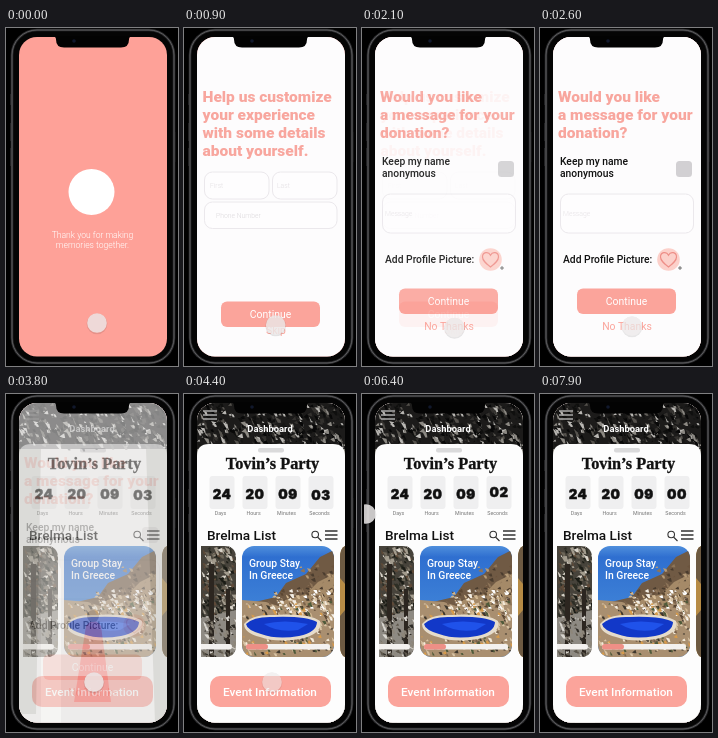
Recreate the animation shown at these times as an HTML page. Size 172 by 338 pixels, loop 8 s.

```html
<!DOCTYPE html>
<html lang="en">
<head>
<meta charset="utf-8">
<title>Gift app walkthrough</title>
<style>
html, body { margin: 0; width: 100%; height: 100%; overflow: hidden; background: #000; }
svg { display: block; width: 172px; height: 338px; font-family: Roboto, sans-serif; }
</style>
</head>
<body>
<svg id="stage" viewBox="0 0 172 338"></svg>
<script>
const LOOP = 8000, STEP = 100, PINK = '#fba49b', INK = '#111';

let seed = 7;
const rand = () => (seed = seed * 16807 % 2147483647) / 2147483647;

const rect = (x, y, w, h, r, fill, extra = '') =>
  `<rect x="${x}" y="${y}" width="${w}" height="${h}" rx="${r}" fill="${fill}" ${extra}/>`;
const text = (str, x, y, size, fill, weight = 400, extra = '') =>
  `<text x="${x}" y="${y}" font-size="${size}" fill="${fill}" font-weight="${weight}" ${extra}>${str}</text>`;
const centred = (str, x, y, size, fill, weight = 400, extra = '') =>
  text(str, x, y, size, fill, weight, `text-anchor="middle" ${extra}`);
const path = (d, fill, extra = '') => `<path d="${d}" fill="${fill}" ${extra}/>`;
const lines = (rows, x, y, gap, size, fill, weight) =>
  rows.map((row, i) => text(row, x, y + i * gap, size, fill, weight)).join('');
const field = (x, y, w, h) => rect(x, y, w, h, 8, '#fefdfe', 'stroke="#ebe8ec"');
const menu = (x, y, w, gap, colour) =>
  path(`M${x} ${y}h${w}m${-w} ${gap}h${w}m${-w} ${gap}h${w}`, 'none', `stroke="${colour}" stroke-width="1.3"`);
const button = (label, y) =>
  rect(37, y, 99, 25.5, 6, PINK) + centred(label, 86.5, y + 16.4, 10.4, '#fff');
const backdrop = fill => rect(13, 9, 148, 320, 0, fill);

// Scatters small slivers of foliage, stone or light over an area.
function speckle(x, y, w, h, count, colours, size = 3) {
  let out = '';
  for (let i = 0; i < count; i++) {
    const px = x + rand() * w, py = y + rand() * h, s = 1 + rand() * size, lean = (rand() - .5) * 2 * size;
    const fill = colours[Math.floor(rand() * colours.length)];
    out += path(`M${px.toFixed(1)} ${py.toFixed(1)}l${s.toFixed(1)} ${lean.toFixed(1)} 1 ${s.toFixed(1)}-2 0z`, fill);
  }
  return out;
}

const thanks = backdrop('#fea198') +
  '<circle cx="85.5" cy="164" r="23" fill="#fff"/>' +
  centred('Thank you for making', 86.5, 210, 8.6, '#fff', 300) +
  centred('memories together.', 86.5, 220, 8.6, '#fff', 300);

const details = backdrop('#fdfcfd') +
  lines(['Help us customize', 'your experience', 'with some details', 'about yourself.'], 18.5, 73.5, 18.1, 15.5, '#f8a69e', 900) +
  field(20.5, 144, 64.5, 27) + field(88.5, 144, 64.5, 27) + field(20.5, 174, 132.5, 26.5) +
  text('First', 26, 160, 6.8, '#e3dfe3', 300) + text('Last', 93, 160, 6.8, '#e3dfe3', 300) +
  text('Phone Number', 32, 189.5, 6.8, '#dcd8dc', 300) +
  button('Continue', 273.5) + centred('Skip', 92, 305.5, 10.4, PINK);

const message = backdrop('#fdfcfd') +
  lines(['Would you like', 'a message for your', 'donation?'], 18, 74, 18.2, 15.5, '#f8a69e', 900) +
  lines(['Keep my name', 'anonymous'], 20, 136.5, 12, 10.3, INK, 500) +
  rect(136, 133, 16, 16, 3.5, '#d2d0d3') +
  field(20.5, 166, 133, 39) + text('Message', 23, 188, 6.8, '#e6e2e6', 300) +
  text('Add Profile Picture:', 23, 235, 10.3, INK, 500) +
  '<circle cx="128.5" cy="231.5" r="11.3" fill="#fcd0ca"/>' +
  path('M128.5 239c-5-4-8-6.5-8-10 0-5 6-6 8-1.8 2-4.2 8-3.2 8 1.8 0 3.5-3 6-8 10z', 'none', 'stroke="#ee8f88" stroke-width="1.2"') +
  path('M138 240h4m-2-2v4', 'none', 'stroke="#555" stroke-width=".8"') +
  button('Continue', 260.5) + centred('No Thanks', 87, 301.5, 10.4, PINK);

const garden = backdrop('#bdb9b3') +
  rect(13, 9, 148, 46, 0, '#1c1b1a') +
  speckle(13, 9, 146, 42, 420, ['#080808', '#0f0f0e', '#33312e', '#55524d', '#8c8983', '#b9b7b3', '#161615'], 4) +
  path('M13 55h22l-5 265H13zM140 55h21v274h-12z', '#77746b') +
  path('M35 329V175q10-22 20 0v154z', '#dedbd5') +
  path('M80 232q8-10 15 0l10 76H68z', '#d23a36') +
  '<circle cx="87" cy="222" r="6" fill="#574236"/>';

const island = '<g clip-path="url(#main)">' +
  rect(58, 152, 92, 111, 0, 'url(#sky)') +
  path('M150 156l-14 7-14 17-20 9-10 14-34 8v10h92z', '#705a44') +
  path('M150 180l-16 8-12 12-24 7-8 14h60z', '#a58a68') +
  path('M58 206l24 2 24 8 44-10v57H58z', '#a98f70') +
  speckle(112, 172, 38, 40, 70, ['#4a3c2e', '#8d7458', '#b59a76', '#6c543e']) +
  speckle(88, 196, 60, 26, 110, ['#f4efe6', '#d2b892', '#5c4834', '#fff']) +
  speckle(58, 206, 90, 54, 210, ['#d9c4a5', '#7b634c', '#3f382e', '#d79b4b', '#f3ead9', '#4f5a3a']) +
  path('M60 230q8-10 30-9 34-2 46 6 3 13-20 18-24 4-40-2-16-4-16-13z', '#e6dccb') +
  path('M62 230q8-8 28-7 32-1 43 5 0 10-18 14-22 4-38-2-14-4-15-10z', '#1238c8') +
  path('M80 230q20-5 44 0l-10 6q-20 3-34-6z', '#1f52ea') +
  rect(62, 250, 84, 5.5, 2.7, '#f3f1ef') + rect(62, 250, 22, 5.5, 2.7, '#ee8f86') + '</g>' +
  lines(['Group Stay', 'In Greece'], 65, 172.5, 12, 10.4, '#fff', 500);

const neighbours = '<g clip-path="url(#left)">' + rect(17, 152, 35, 111, 0, '#47433b') +
  speckle(17, 152, 34, 72, 230, ['#1b1c16', '#2d2e25', '#6d6658', '#a39c8e', '#d8d3c9', '#5f4a38'], 4) +
  path('M17 224l35-8v47H17z', '#8e8a83') + path('M25 170h5v93h-5zM42 195h4v68h-4z', '#2c2620') +
  speckle(17, 220, 34, 42, 110, ['#d9d6d0', '#2f2c27', '#8d867a', '#5d574c']) +
  rect(10, 250, 38, 5.5, 2.7, '#f3f1ef') + '</g>' +
  path('M161 152q-5 2-5 12v87q0 10 5 12z', '#b68b45') +
  path('M161 152q-5 2-5 12v20l5 6zM156 222l5-6v47q-5-2-5-12z', '#6d5a42');

const counters = [['24', 'Days'], ['20', 'Hours'], ['09', 'Minutes'], ['03', 'Seconds']].map(([value, unit], i) => {
  const x = 38 + i * 33;
  return rect(x - 12.5, 82, 25, 33, 3, '#efeff0') +
    centred(value, x, 104.5, 13.3, INK, 900, `id="${unit}" font-family="Inter, sans-serif" letter-spacing=".5" stroke="${INK}" stroke-width=".4"`) +
    centred(unit, x - 1.5, 121.3, 5.3, '#777');
}).join('');

const card = centred('Dashboard', 86, 37.5, 9.4, '#fff', 700) +
  menu(19, 17, 14, 4, '#aaa') +
  path('M13 62q0-12 12-12h124q12 0 12 12v267H13z', '#fdfdfd') +
  rect(74, 54, 26, 4.5, 2, '#dadadb') +
  centred('Tovin’s Party', 88.5, 74.5, 16.3, INK, 700, `font-family="Liberation Serif, serif" stroke="${INK}" stroke-width=".3"`) +
  counters +
  text('Brelma List', 23, 146, 13.6, INK, 500) +
  path('M134 143.5l3.500 3.500M134.500 140.500a3.300 3.300 0 1 1-6.600 0a3.300 3.300 0 1 1 6.600 0', 'none', 'stroke="#333" stroke-width="1.1"') +
  menu(141, 137, 12.5, 4, '#333') +
  neighbours + island +
  rect(26, 282, 121, 31, 10, PINK) + centred('Event Information', 86, 302, 11.8, '#fff', 500);

const stage = document.getElementById('stage');
stage.innerHTML = `
  <defs>
    <clipPath id="screen">${rect(13, 9, 148, 319.5, 18, '#fff')}</clipPath>
    <clipPath id="main">${rect(58, 152, 92, 111, 12, '#fff')}</clipPath>
    <clipPath id="left">${path('M17 152h23q12 0 12 12v87q0 12-12 12h-23z', '#fff')}</clipPath>
    <clipPath id="edge">${rect(2, 0, 170, 338, 0, '#fff')}</clipPath>
    <linearGradient id="sky" x2="0" y2="1">
      <stop stop-color="#4f8fdc"/><stop offset=".1" stop-color="#2f6fd0"/><stop offset=".5" stop-color="#3c7fd6"/>
    </linearGradient>
  </defs>
  ${rect(0, 0, 172, 338, 0, '#000')}
  ${path('M5 66v11M5 95v18M5 120v18M168.500 104v30', 'none', 'stroke="#2b2b2d" stroke-width="1.5"')}
  ${rect(6, 2, 162, 333, 25, '#050505', 'stroke="#2a2a2c" stroke-width="2.6"')}
  ${rect(6, 2, 162, 333, 25, 'none', 'stroke="#5c5c5e" stroke-width="1"')}
  <g clip-path="url(#screen)">
    <g>${thanks}</g><g id="details">${details}</g><g id="message">${message}</g>
    <g id="garden">${garden}</g><g id="card">${card}</g>
  </g>
  ${path('M47 8.500q3 0 3 3 0 8 8 8h57q8 0 8-8 0-3 3-3z', '#030303')}
  <circle cx="68" cy="13" r="1.8" fill="#11182c"/>
  <g clip-path="url(#edge)"><g id="touch">
    <circle cy=".8" r="10.4" fill="#000" opacity=".12"/><circle r="9.8" fill="#ebe8e8"/>
  </g></g>`;

const [detailsEl, messageEl, gardenEl, cardEl, touchEl, secondsEl] =
  ['details', 'message', 'garden', 'card', 'touch', 'Seconds'].map(id => document.getElementById(id));

// time, x, y, opacity
const touchKeys = [
  [0, 91, 295, .8], [700, 91, 295, .8], [1200, 93, 301, .85], [1700, 93, 301, .85],
  [2500, 92, 298, .7], [3300, 92, 298, .8], [3600, 88, 288, .85], [4100, 88, 288, .8],
  [4400, 88, 288, .55], [4800, 88, 288, 0], [6100, 4, 120, 0], [6300, 4, 120, .85],
  [6700, 4, 120, .85], [6900, 4, 120, 0], [LOOP, 4, 120, 0]
];

const ramp = (t, from, to) => Math.min(1, Math.max(0, (t - from) / (to - from)));
const smooth = p => p * p * (3 - 2 * p);

function touchAt(t) {
  const next = touchKeys.findIndex(key => key[0] > t);
  const a = touchKeys[next - 1], b = touchKeys[next], p = smooth(ramp(t, a[0], b[0]));
  return a.map((v, i) => v + (b[i] - v) * p);
}

function draw(now) {
  const t = Math.floor(now % LOOP / STEP) * STEP;
  detailsEl.setAttribute('opacity', smooth(ramp(t, 0, 500)));
  messageEl.setAttribute('opacity', smooth(ramp(t, 1700, 2200)));
  const arrive = smooth(ramp(t, 3500, 4100));
  gardenEl.setAttribute('opacity', arrive);
  cardEl.setAttribute('opacity', arrive);

  const left = t < 5400 ? 3 : t < 6500 ? 2 : t < 7500 ? 1 : 0;
  secondsEl.textContent = '0' + left;
  secondsEl.setAttribute('y', 104.5 + [0, 0, -1.5, 1.5][left]);

  const [, x, y, opacity] = touchAt(t);
  touchEl.setAttribute('transform', `translate(${x} ${y})`);
  touchEl.setAttribute('opacity', opacity);
  requestAnimationFrame(tick);
}

const start = performance.now();
const tick = () => draw(performance.now() - start);
tick();
</script>
</body>
</html>
```
